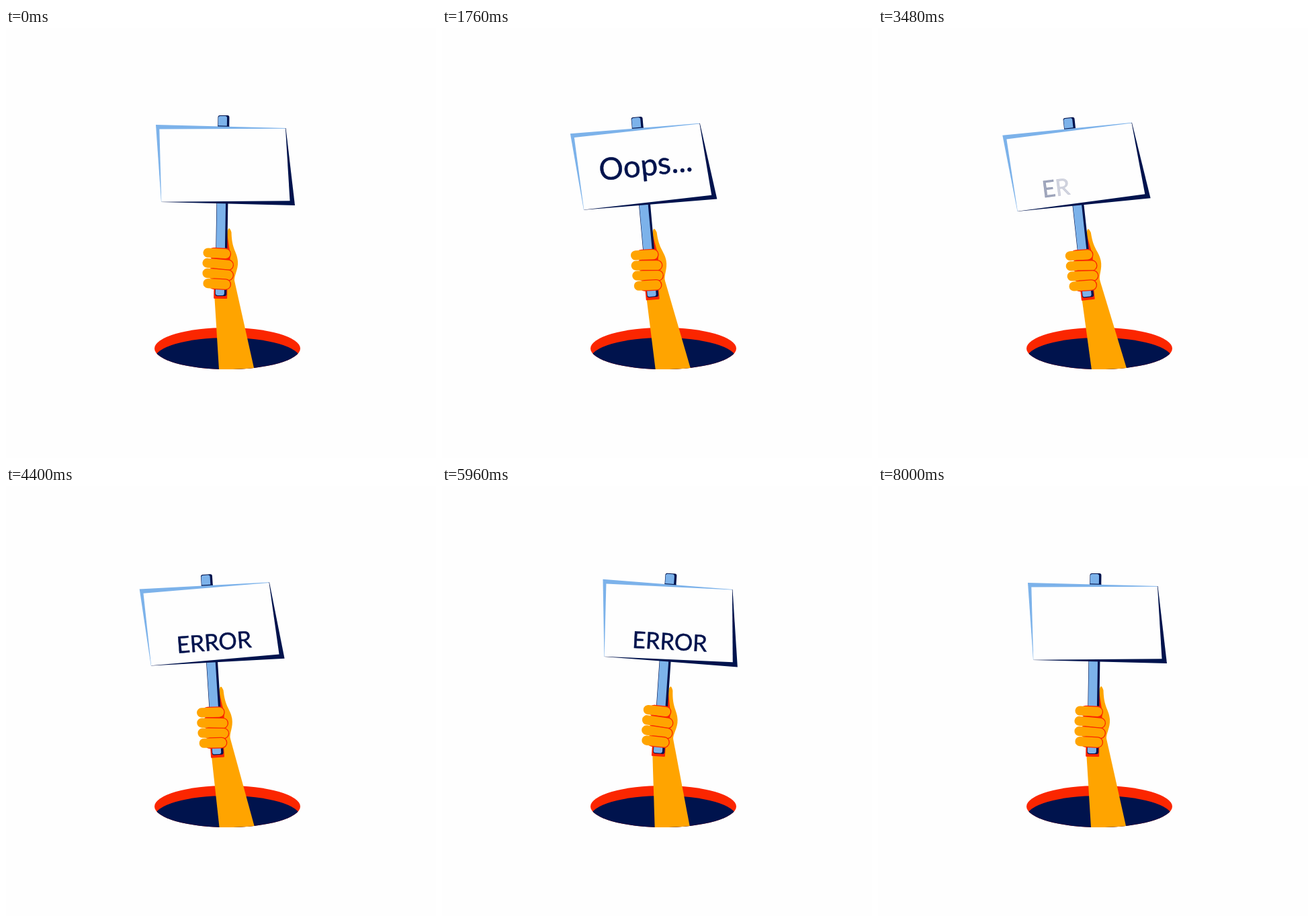
Write an HTML page with a canvas that moves like this. It is 640x640 px and loops after 8160 ms.

```html
<!DOCTYPE html>
<html lang="en">
<head>
<meta charset="utf-8">
<title>Error sign</title>
<style>
  html, body { margin: 0; width: 100%; height: 100%; overflow: hidden; background: #fefefe; }
  canvas { display: block; width: 100vmin; height: 100vmin; }
</style>
</head>
<body>
<canvas id="stage" width="640" height="640"></canvas>
<script>
const ctx = document.getElementById('stage').getContext('2d');
const LOOP = 8160, STEP = 40, END = 8000;
const WHITE = '#fefefe', NAVY = '#00134d', BLUE = '#7cb2ea', RED = '#fb2600', ORANGE = '#ffa400';
const PIVOT = { x: 331, y: 454 };
const RAD = Math.PI / 180;

// A slow lean, four swings on an even beat, then rest: [time, degrees]
const BEAT = 405, FIRST = 5288;
const swings = [20.8, -23.8, 12.9, -4.8].map((deg, i) => [FIRST + i * BEAT, deg]);
const KEYS = [[0, 0], [2800, -8.8], [4360, -4.7], ...swings, [END, 0]];

const WORDS = [
  { text: 'Oops...', size: 45.6, x: 329.5, y: 218.5, show: [80, 1040], hide: [2160, 3200] },
  { text: 'ERROR', size: 34.3, x: 327.3, y: 243.6, show: [3280, 4240], hide: [6960, 7880] }
];

const clamp = v => Math.max(0, Math.min(1, v));
const smooth = x => x * x * (3 - 2 * x);

function tiltAt(t) {
  const i = Math.max(1, KEYS.findIndex(key => t <= key[0]));
  const [t0, a] = KEYS[i - 1], [t1, b] = KEYS[i];
  return a + (b - a) * smooth((t - t0) / (t1 - t0));
}

function turned(x, y, rad) {
  const dx = x - PIVOT.x, dy = y - PIVOT.y, c = Math.cos(rad), s = Math.sin(rad);
  return [PIVOT.x + dx * c - dy * s, PIVOT.y + dx * s + dy * c];
}

function fillPath(color, trace) {
  ctx.beginPath();
  trace();
  ctx.fillStyle = color;
  ctx.fill();
}

const poly = (color, ...points) => fillPath(color, () => points.forEach(p => ctx.lineTo(...p)));
const box = (color, x, y, w, h, r) => fillPath(color, () => ctx.roundRect(x, y, w, h, r));
const oval = (color, y) => fillPath(color, () => ctx.ellipse(329.5, y, 108.5, 31, 0, 0, Math.PI * 2));

function bar(color, x1, y1, x2, y2, width) {
  ctx.beginPath();
  ctx.moveTo(x1, y1);
  ctx.lineTo(x2, y2);
  ctx.lineWidth = width;
  ctx.lineCap = 'round';
  ctx.strokeStyle = color;
  ctx.stroke();
}

function hole() {
  ctx.save();
  oval(RED, 477);
  ctx.clip();
  oval(NAVY, 492);
  ctx.restore();
}

// The forearm's foot stays in the hole while its top follows the hand
function forearm(deg) {
  const rad = deg * RAD, shift = -0.12 * deg;
  fillPath(ORANGE, () => {
    ctx.moveTo(...turned(318, 370, rad));
    ctx.lineTo(...turned(310, 395, rad));
    ctx.lineTo(317 + shift, 508);
    ctx.quadraticCurveTo(345 + shift, 508.5, 369 + shift, 506);
    ctx.lineTo(...turned(340, 376, rad));
  });
}

function thumb() {
  fillPath(ORANGE, () => {
    ctx.moveTo(316, 390);
    ctx.lineTo(329.5, 303);
    ctx.quadraticCurveTo(332, 293, 335.5, 304);
    ctx.bezierCurveTo(336, 330, 344, 333, 345, 347);
    ctx.bezierCurveTo(346, 360, 339, 368, 340, 377);
  });
  poly(RED, [329, 306], [334, 338], [333, 348], [322, 348]);
}

function stick() {
  ctx.save();
  ctx.translate(324, 130);
  ctx.rotate(0.92 * RAD);
  box(RED, -10.5, 250, 20, 23, 1);
  box(NAVY, -8.5, 0, 17, 269, 3);
  box(BLUE, -7.9, 1, 13, 267, 3);
  box(NAVY, -8.5, 15.5, 17, 2.5, 0);
  ctx.restore();
}

function board() {
  const right = [416.5, 149], low = [231, 259];
  poly(BLUE, [223, 144], right, low);
  poly(NAVY, right, [430, 264], low);
  poly(WHITE, [228.3, 150.5], [416, 149.7], [422.5, 257.2], [231.3, 258.8]);
}

function fingers() {
  for (let i = 0; i < 4; i++) {
    const bulge = i * (3 - i) / 2;
    const x = 300.5 - bulge, y = 334.5 + 15.2 * i;
    const tipX = 326.7 + 4 * bulge, tipY = y + 1.5 + 1.5 * bulge;
    bar(RED, x + 9, y + 0.6, tipX, tipY, 16.8);
    bar(ORANGE, x, y, tipX, tipY, 14.2);
  }
}

// Letters fade one after another from the left
function sweep(i, count, t, [from, to]) {
  const spread = 5.5;
  const head = clamp((t - from) / (to - from)) * (count - 1 + spread);
  return clamp((head - i) / spread);
}

function word({ text, size, x, y, show, hide }, t) {
  ctx.font = size + 'px Lato, "Open Sans", sans-serif';
  ctx.fillStyle = ctx.strokeStyle = NAVY;
  ctx.lineWidth = 0.5;
  const width = s => ctx.measureText(s).width;
  const left = x - width(text) / 2;
  [...text].forEach((ch, i) => {
    const at = left + width(text.slice(0, i + 1)) - width(ch);
    ctx.globalAlpha = clamp(sweep(i, text.length, t, show) - sweep(i, text.length, t, hide));
    ctx.fillText(ch, at, y);
    ctx.strokeText(ch, at, y);
  });
  ctx.globalAlpha = 1;
}

function draw(t) {
  const deg = tiltAt(t);
  ctx.fillStyle = WHITE;
  ctx.fillRect(0, 0, 640, 640);
  hole();
  forearm(deg);
  ctx.save();
  ctx.translate(PIVOT.x, PIVOT.y);
  ctx.rotate(deg * RAD);
  ctx.translate(-PIVOT.x, -PIVOT.y);
  thumb();
  stick();
  board();
  WORDS.forEach(w => word(w, t));
  fingers();
  ctx.restore();
}

const start = performance.now();
function tick() {
  const t = (performance.now() - start) % LOOP;
  draw(Math.min(END, Math.floor(t / STEP) * STEP));
  requestAnimationFrame(tick);
}
tick();
</script>
</body>
</html>
```
